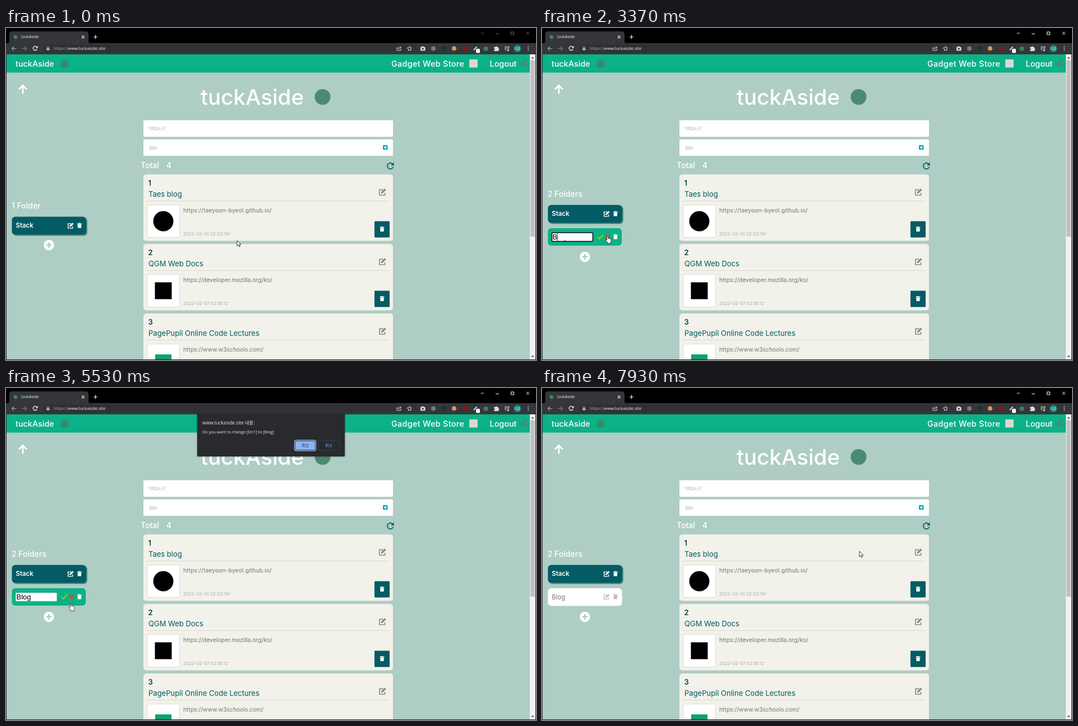
These frames come from a looping animation (945x592 px, 8000 ms). An HTML page:

```html
<!DOCTYPE html>
<html lang="en">
<head>
<meta charset="utf-8">
<title>Bookmark folders</title>
<style>
html, body { margin: 0; width: 100%; height: 100%; overflow: hidden; background: #000; }
svg { display: block; }
text { font-family: Inter, "Open Sans", sans-serif; fill: currentColor; white-space: pre; }
.ui { font-family: "Open Sans", "Noto Sans CJK KR", "Noto Sans CJK", sans-serif; }
.field { font-family: "Liberation Sans", Arial, sans-serif; }
.medium { font-weight: 500; }
.nav { font-size: 14.4px; font-weight: 500; }
.side { font-size: 14px; font-weight: 500; }
.hint { font-size: 9.7px; color: #b5bab2; }
.num { font-size: 13px; font-weight: 600; color: #0a4650; }
.name { font-size: 13px; color: #005a62; }
.link { font-size: 10.35px; color: #747873; }
.date { font-size: 8.1px; color: #aeb0aa; }
.line { fill: none; stroke: currentColor; }

/* Hard switches */
#controls, #one, #many, #lift, #plus, #dir, #back, #show, #pen, #edit, #ring,
#picked, #typed, #caret, #dialog, #hand, #arrow { animation: 8s step-end infinite; }
#controls { animation-name: controls; }
#one { animation-name: one; }
#many, #dir { animation-name: many; }
#lift { animation-name: lift; }
#plus { animation-name: plus; }
#back { animation-name: back; }
#show { animation-name: show; }
#dir { color: #fff; }
#tint { animation: tint 8s step-end infinite; }
#pen { animation-name: pen; }
#edit { animation-name: edit; }
#ring { animation-name: ring; }
#picked { animation-name: picked; }
#typed { animation-name: typed; }
#caret { animation-name: caret; }
#dialog { animation-name: dialog; }
#hand { animation-name: hand; }
#arrow { animation-name: arrow; }
#cursor { animation: cursor 8s linear infinite; }

@keyframes controls { 0% { opacity: .4 } 1.75%, 100% { opacity: 1 } }
@keyframes one { 0% { opacity: 1 } 15.625%, 100% { opacity: 0 } }
@keyframes many { 0% { opacity: 0 } 15.625%, 100% { opacity: 1 } }
@keyframes lift { 0% { transform: translateY(21px) } 15.625%, 100% { transform: none } }
@keyframes plus { 0% { transform: translateY(-21px) } 15.625%, 100% { transform: none } }
@keyframes back { 0% { fill: #0cb187 } 82.125%, 100% { fill: #fff } }
@keyframes tint { 0% { color: #fff } 82.125%, 100% { color: #bdbdbd } }
@keyframes show { 0% { opacity: 1 } 30.5% { opacity: 0 } 86.375%, 100% { opacity: 1 } }
@keyframes pen { 0% { color: #fff } 22.75% { color: #d8592a } 28.75% { color: #f0602a } 30.5%, 100% { color: #bdbdbd } }
@keyframes edit { 0% { opacity: 0 } 30.5% { opacity: 1 } 86.375%, 100% { opacity: 0 } }
@keyframes ring { 0% { opacity: 1 } 66.5%, 100% { opacity: 0 } }
@keyframes picked { 0% { opacity: 1 } 42.125%, 100% { opacity: 0 } }
@keyframes typed {
  0% { transform: none } 42.125% { transform: translateX(9.3px) } 44% { transform: translateX(12px) }
  47.25% { transform: translateX(19.2px) } 48.875%, 100% { transform: translateX(26.4px) }
}
@keyframes caret { 0% { opacity: 0 } 42.125% { opacity: 1 } 55.5% { opacity: 0 } 62.125% { opacity: 1 } 66.5%, 100% { opacity: 0 } }
@keyframes dialog { 0% { opacity: 0 } 68.25% { opacity: 1 } 81.25%, 100% { opacity: 0 } }
@keyframes hand { 0% { opacity: 0 } 11.5% { opacity: 1 } 69.5% { opacity: 0 } 82% { opacity: 1 } 85.5%, 100% { opacity: 0 } }
@keyframes arrow { 0% { opacity: 1 } 11.5% { opacity: 0 } 69.5% { opacity: 1 } 82% { opacity: 0 } 85.5%, 100% { opacity: 1 } }
@keyframes cursor {
  0%, .8% { transform: translate(412px, 379px) }
  3% { transform: translate(370px, 381px) }
  7% { transform: translate(210px, 389px) }
  10% { transform: translate(112px, 389px) }
  12.5% { transform: translate(80px, 385px) }
  17% { transform: translate(77px, 384px) }
  20.5% { transform: translate(108px, 376px) }
  22.5% { transform: translate(115px, 370px) }
  25.4%, 58.8% { transform: translate(117px, 371px) }
  61.5% { transform: translate(111px, 372px) }
  65%, 68.6% { transform: translate(102px, 374px) }
  71.5% { transform: translate(175px, 430px) }
  73.5% { transform: translate(290px, 410px) }
  76% { transform: translate(450px, 220px) }
  78.6%, 80% { transform: translate(531px, 108px) }
  82%, 84.7% { transform: translate(529px, 112px) }
  86.5% { transform: translate(478px, 220px) }
  88.8% { transform: translate(393px, 370px) }
  90.5% { transform: translate(380px, 384px) }
  93% { transform: translate(430px, 374px) }
  96% { transform: translate(525px, 320px) }
  99.1%, 100% { transform: translate(566px, 291px) }
}
</style>
</head>
<body>
<svg width="945" height="592" viewBox="0 0 945 592">
  <defs>
    <g id="pencil">
      <path class="line" stroke-width="1.4" d="M6.5 2.4H1.2V10.4H9.2V7"/>
      <path fill="currentColor" d="M3.7 8V5.9L8.9 .7 11 2.8 5.8 8Z"/>
    </g>
    <path id="bin" fill="currentColor" d="M0 .8H2.3L3 0H5L5.7 .8H8V1.9H0ZM.6 2.5H7.4L7 9H1Z"/>
    <g id="card">
      <rect x="245" y="261" width="445" height="118.500" rx="5" fill="#f2f1ea"/>
      <path d="M251 308.500H684" stroke="#d9d9d3"/>
      <use href="#pencil" transform="translate(664.500 285.500) scale(1.2)" color="#8d8e8b"/>
      <rect x="251.500" y="315.500" width="58" height="58" rx="2" fill="#fff" stroke="#dcdcd6"/>
      <rect x="657" y="344.500" width="27" height="29" rx="1" fill="#045b64"/>
      <use href="#bin" x="666.500" y="354" color="#fff"/>
    </g>
    <clipPath id="page"><rect x="1" y="47" width="943" height="544"/></clipPath>
  </defs>

  <!-- Browser frame -->
  <rect width="945" height="592" fill="#000"/>
  <path d="M0 27H945V47H0ZM2 27Q6 27 6 23V11Q6 6 11 6H142Q147 6 147 11V23Q147 27 151 27Z" fill="#35363a"/>
  <rect x="66" y="29" width="665" height="15" rx="7.500" fill="#303135"/>
  <circle cx="17" cy="16" r="3.500" fill="#3f7f62"/>
  <g color="#f1f1f1">
    <text class="ui" x="27" y="18.400" font-size="7">tuckAside</text>
    <path class="line" d="M135.200 13.700l4.600 4.600m0-4.600l-4.600 4.600M156 16h7m-3.500-3.500v7" stroke-width="1.200"/>
    <path class="line" d="M55 33.800A3.700 3.700 0 1 0 55.600 37.500" stroke-width="1.300"/>
    <path d="M56.500 32v3.800h-3.800z" fill="currentColor"/>
    <text class="ui" x="85" y="39" font-size="7.500"><tspan fill="#a9abae">https://</tspan>www.tuckaside.site</text>
  </g>
  <g color="#a9abae">
    <path class="line" d="M18.500 36.500h-8m3.600-3.600l-3.600 3.600 3.600 3.600" stroke-width="1.200"/>
    <path class="line" d="M28.500 36.500h8m-3.600-3.600l3.600 3.600-3.600 3.600" stroke-width="1.200" opacity=".6"/>
    <path d="M72.300 35.500h5.400v4.300h-5.400z" fill="currentColor"/>
    <path class="line" d="M73.500 35.500v-1.200a1.500 1.500 0 0 1 3 0v1.200"/>
  </g>
  <g color="#d9dadc">
    <path class="line" d="M699 35h-2v5h7v-3M699.500 38q.5-3.500 4.500-3.500m-2-2l2.300 2-2.300 2"/>
    <path class="line" d="M719.500 32.500l1.200 2.700 2.900.3-2.200 2 .6 2.900-2.500-1.500-2.500 1.500.6-2.900-2.200-2 2.900-.3z"/>
    <path d="M739 34h2l.8-1.200h2.800l.8 1.200h2v6.500h-8.400z" fill="currentColor"/>
    <circle cx="743.200" cy="37" r="1.700" fill="#35363a"/>
    <path d="M870 34h2.500a1.600 1.600 0 0 1 3.200 0h2.300v2.600a1.500 1.500 0 0 1 0 3v1.700h-8v-2a1.500 1.500 0 0 0 0-3z" fill="currentColor"/>
    <path class="line" d="M889 33.500h6m-6 2.500h6m-6 2.500h3.500m3.500 1.500v-6.500h2" stroke-width="1.100"/>
    <circle cx="895" cy="40" r="1.400" fill="currentColor"/>
    <path d="M930.500 32.500h1.500v1.500h-1.500zm0 3.300h1.500v1.500h-1.500zm0 3.300h1.500v1.500h-1.500z" fill="currentColor"/>
    <path class="line" d="M834 39l5.500-5.500" stroke-width="2"/>
  </g>
  <circle cx="762" cy="36.500" r="4" fill="#777b7f"/>
  <circle cx="781" cy="36.500" r="4" fill="#18382d"/>
  <circle cx="799" cy="36.500" r="4" fill="#d79558"/>
  <circle cx="818" cy="36.500" r="4" fill="#8e1717"/>
  <rect x="838" y="37" width="7" height="7.500" rx="1.500" fill="#f3f3f3"/>
  <circle cx="855.500" cy="37" r="4" fill="#3f7f62"/>
  <circle cx="912" cy="36.500" r="6.300" fill="#128e83"/>
  <text class="ui" x="912" y="38.700" font-size="5.500" text-anchor="middle" color="#fff">다온</text>
  <g id="controls" color="#fff">
    <path class="line" d="M846.700 8l2.600 2.600 2.600-2.600M873 10.500h6M900.500 7h5v5h-5zM927.800 6.800l5 5m0-5l-5 5"/>
  </g>

  <!-- Page -->
  <g clip-path="url(#page)">
    <rect x="1" y="47" width="933" height="544" fill="#aecdc4"/>
    <rect x="1" y="47" width="933" height="32.500" fill="#0bb187"/>
    <g color="#fff">
      <text class="nav" x="17" y="68.500">tuckAside</text>
      <text class="nav" x="687" y="68.500" letter-spacing=".3">Gadget Web Store</text>
      <text class="nav" x="862.500" y="68.500">Logout</text>
      <text class="medium" x="347" y="136.500" font-size="38.500">tuckAside</text>
      <text class="side" x="240" y="250">Total</text>
      <text class="side" x="286" y="250">4</text>
      <path class="line" d="M30 117.500V102.500m-7 7l7-7 7 7" stroke-width="2.700"/>
    </g>
    <circle cx="105" cy="64" r="7.500" fill="#338d6c"/>
    <rect x="826" y="56" width="15" height="14.500" rx="1" fill="#d9d8d4"/>
    <g color="#4b8573">
      <path class="line" d="M921 57h6.800v13H921" stroke-width="1.500"/>
      <path d="M916 62h4.500v-3l5 4.600-5 4.600v-3H916z" fill="currentColor"/>
    </g>
    <circle cx="564.500" cy="123" r="14" fill="#4b8a70"/>

    <rect x="245" y="164.500" width="445" height="29.500" rx="2" fill="#fff"/>
    <rect x="245" y="198.500" width="445" height="29.500" rx="2" fill="#fff"/>
    <rect x="663" y="199.500" width="26" height="27.500" fill="#f9fefd"/>
    <text class="field hint" x="255" y="182">https://</text>
    <text class="field hint" x="255" y="216.500">title</text>
    <rect x="672" y="209" width="8.500" height="8" rx="1" fill="#0fa5ac"/>
    <path d="M673.800 213h5m-2.500-2.500v5" stroke="#fff" stroke-width="1.300"/>
    <g color="#05606a">
      <path class="line" d="M689.300 242.500A5.300 5.300 0 1 0 690.400 247.500" stroke-width="1.700"/>
      <path d="M691.700 239.500v5.500h-5.500z" fill="currentColor"/>
    </g>

    <g>
      <use href="#card"/>
      <text class="num" x="253.500" y="280.500">1</text>
      <text class="name" x="254" y="300.500">Taes blog</text>
      <circle cx="280.500" cy="344.500" r="18" fill="#000"/>
      <text class="link" x="316" y="329" letter-spacing=".1">https://taeyoon-byeol.github.io/</text>
      <text class="date" x="316" y="370">2022-02-14 02:33:58</text>
    </g>
    <g transform="translate(0 124)">
      <use href="#card"/>
      <text class="num" x="253.500" y="280.500">2</text>
      <text class="name" x="254" y="300.500">QGM Web Docs</text>
      <rect x="265.500" y="329.500" width="30" height="30" fill="#000"/>
      <text class="link" x="316" y="329">https://developer.mozilla.org/ko/</text>
      <text class="date" x="316" y="370">2022-02-07 02:18:12</text>
    </g>
    <g transform="translate(0 248)">
      <use href="#card"/>
      <text class="num" x="253.500" y="280.500">3</text>
      <text class="name" x="254" y="300.500">PagePupil Online Code Lectures</text>
      <rect x="266" y="334" width="29" height="29" fill="#10a06f"/>
      <text class="link" x="316" y="329">https://www.w3schools.com/</text>
    </g>

    <!-- Folder list -->
    <g id="lift" color="#fff">
      <text id="one" class="side" x="10" y="300.500">1 Folder</text>
      <text id="many" class="side" x="10" y="300.500">2 Folders</text>
      <rect x="12.500" y="317.500" width="132.500" height="32" rx="6" fill="#4c8b78"/>
      <rect x="10.500" y="315.500" width="132.500" height="32" rx="6" fill="#035c65"/>
      <text x="17.500" y="335" font-size="11.400" font-weight="600">Stack</text>
      <use href="#pencil" x="109.500" y="325.500"/>
      <use href="#bin" x="127" y="326.500"/>
    </g>
    <g id="plus">
      <circle cx="76.500" cy="408" r="9.200" fill="#fff"/>
      <path d="M71.500 408h10m-5-5v10" stroke="#aecdc4" stroke-width="2.500"/>
    </g>
    <g id="dir">
      <rect x="11.200" y="357.700" width="132.500" height="31.500" rx="6" fill="#c9dcd5"/>
      <rect id="back" x="10.500" y="357" width="132" height="31.200" rx="6"/>
      <g id="tint">
        <use href="#bin" x="127" y="367.500"/>
        <g id="show">
          <g id="picked"><text x="17.500" y="376.700" font-size="11.200">Dir1</text></g>
          <g style="animation: edited 8s step-end infinite">
            <text x="17.500" y="376.700" font-size="11.400" color="#777">Blog</text>
          </g>
          <g id="pen"><use href="#pencil" x="109.500" y="366.500"/></g>
        </g>
      </g>
      <g id="edit">
        <rect x="17.500" y="365.300" width="73" height="14.700" rx="1" fill="#fff" stroke="#c9cfcc" stroke-width=".8"/>
        <text class="field" x="18.500" y="377" font-size="13" color="#000">Blog</text>
        <g id="typed">
          <rect x="18.300" y="366.200" width="27.500" height="13" fill="#fff"/>
          <path id="caret" d="M18.200 366.200v13" stroke="#000" stroke-width=".9"/>
        </g>
        <g style="animation: picked 8s step-end infinite">
          <rect x="18.500" y="366.300" width="23" height="12.700" fill="#2f72d6"/>
          <text class="field" x="18.500" y="377" font-size="13" color="#fff">Dir1</text>
        </g>
        <rect id="ring" x="17.500" y="364.900" width="73" height="15.500" rx="1.500" fill="none" stroke="#101010" stroke-width="1.500"/>
        <path d="M98.800 372.500l3.500 3.500 7-7.500" fill="none" stroke="#76d31b" stroke-width="2.400"/>
        <path d="M113.500 368.500l7 7.500m0-7.500l-7 7.500" stroke="#e8431b" stroke-width="2.500"/>
      </g>
    </g>

    <!-- Scrollbar -->
    <rect x="934" y="47" width="10" height="544" fill="#f1f1f1"/>
    <rect x="935" y="57.500" width="8" height="314.500" fill="#c1c1c1"/>
    <path d="M936.500 54.500l2.500-3 2.500 3zM936.500 584.500l2.500 3 2.500-3z" fill="#555"/>
  </g>
  <path d="M.5 47V592M0 591.500H945M944.500 47V592" stroke="#191b29"/>

  <g id="dialog">
    <rect x="339.500" y="45" width="266" height="78.500" rx="3" fill="#000" opacity=".2"/>
    <rect x="341" y="45.500" width="263" height="76.500" rx="2" fill="#292a2d"/>
    <g color="#e8eaed">
      <text class="ui" x="350" y="64.500" font-size="8.300">www.tuckaside.site 내용:</text>
      <text class="ui" x="350" y="80.500" font-size="7.200">Do you want to change [Dir1] to [Blog]</text>
    </g>
    <rect x="514.500" y="93.200" width="38" height="18.600" rx="3" fill="#292a2d" stroke="#a9c8fa" stroke-width="1.200"/>
    <rect x="516" y="94.700" width="35" height="15.600" rx="2" fill="#8ab4f8"/>
    <text class="ui" x="533.500" y="105" font-size="7.200" text-anchor="middle" color="#27303d">확인</text>
    <rect x="557" y="94" width="37.500" height="17" rx="2.500" fill="none" stroke="#3d4043"/>
    <text class="ui" x="575.700" y="105" font-size="7.200" text-anchor="middle" color="#8ab4f8">취소</text>
  </g>

  <g id="cursor" fill="#fff" stroke="#111" stroke-width=".8" stroke-linejoin="round">
    <path id="arrow" d="M0 0V9.800L2.300 7.700 3.900 11.200 5.400 10.500 3.900 7.100H7Z"/>
    <path id="hand" d="M-1.200 .8Q0-.8 1.200 .8V4.500Q2.500 3.800 3.200 4.800 4.800 4.300 5.200 5.400 6.800 5.300 6.400 7.500L5.700 10.500V13H-.5V11L-3.600 7.200Q-3.400 5.600-2 6.200L-1.200 7Z"/>
  </g>
</svg>
<style>
@keyframes edited { 0% { opacity: 0 } 42.125%, 100% { opacity: 1 } }
</style>
</body>
</html>
```
